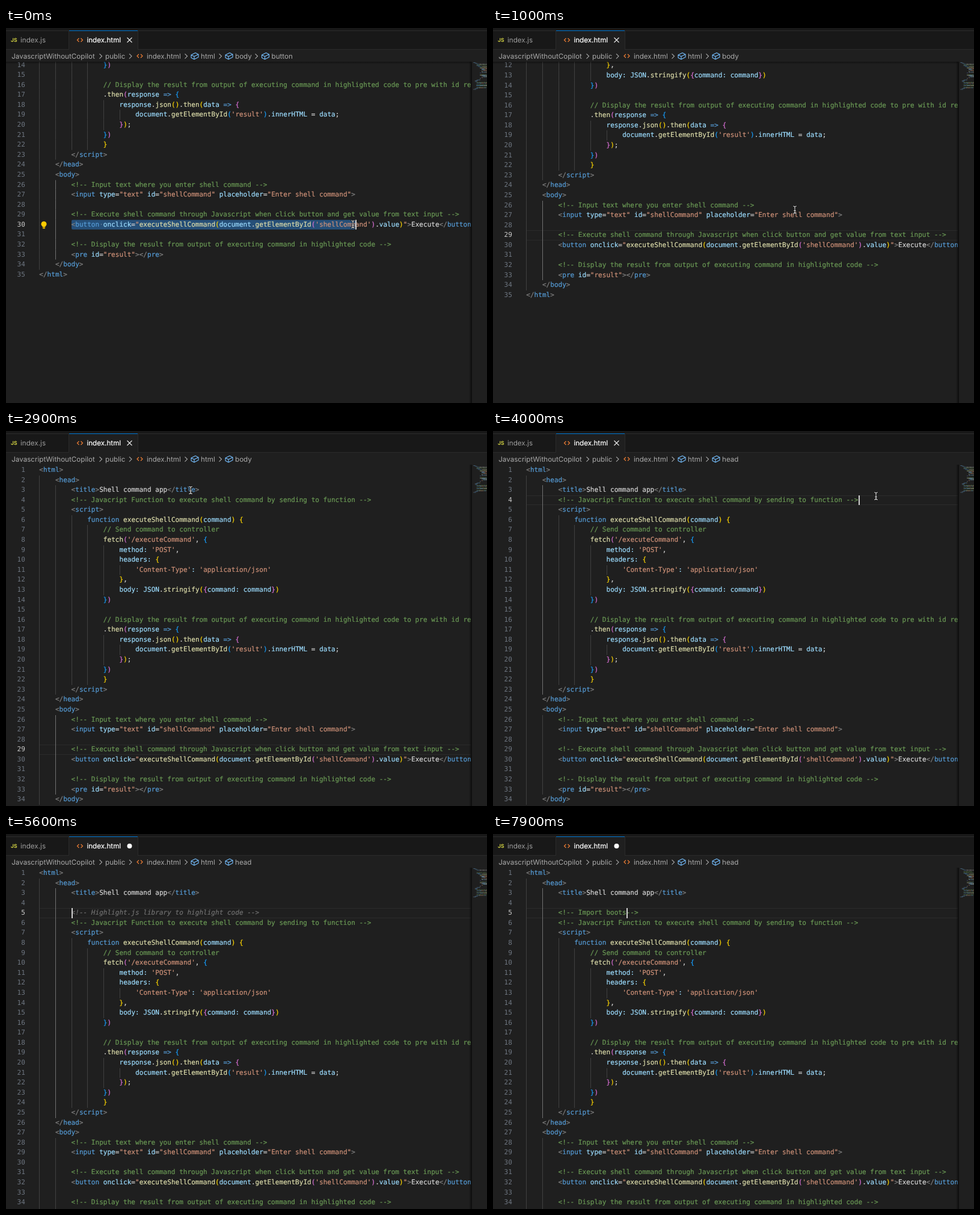
These frames come from a looping animation (800 by 623 pixels, 8 s). An HTML page with a canvas:

```html
<!DOCTYPE html>
<html lang="en">
<head>
<meta charset="utf-8">
<title>Code editor</title>
<style>
html, body { margin: 0; width: 100%; height: 100%; overflow: hidden; background: #1f1f1f; }
#stage { position: relative; width: 800px; height: 623px; overflow: hidden; text-rendering: geometricPrecision; }
#stage div, #stage canvas, #stage svg { position: absolute; }
#chrome { left: 0; top: 0; font: 11.65px Inter, sans-serif; fill: #a9a9a9; }
#editor { left: 0; top: 56px; width: 773px; height: 567px; overflow: hidden;
  font: 11.06px/16.58px "DejaVu Sans Mono", monospace; font-variant-ligatures: none; white-space: pre; color: #ccc; }
#code { left: 0; top: 1px; width: 773px; height: 600px; }
.row { left: 0; width: 773px; height: 16.58px; }
.num { width: 31.8px; text-align: right; color: #6e7681; }
.on .num { color: #ccc; }
.txt { left: 55.3px; -webkit-text-stroke: .2px; }
.guide { top: 0; width: 1px; height: 16.7px; background: #404040; }
.guide.lit { background: #707070; }
.now { left: 55px; width: 718px; height: 14.6px; border: solid #2b2b2b; border-width: 1px 0; }
.sel { height: 16.6px; background: #264f78; border-radius: 2px; }
.caret { width: 2px; height: 16.58px; background: #d0d0d0; }
#top { left: 0; top: 56px; width: 773px; height: 4px; background: linear-gradient(#000a, #0000); }
#edge { left: 770px; top: 56px; width: 5px; height: 567px; background: linear-gradient(90deg, #0000, #0009); }
#map { left: 774px; top: 56px; opacity: .55; }
#mouse { left: -6px; top: -9px; }
.g { color: #808080 } .b { color: #569cd6 } .c { color: #6a9955 } .l { color: #9cdcfe }
.o { color: #ce9178 } .y { color: #dcdcaa } .w { color: #d4d4d4 }
.p1 { color: #ffd700 } .p2 { color: #da70d6 } .p3 { color: #179fff }
.h { color: #6f6f6f; font-style: italic }
</style>
</head>
<body>
<div id="stage">
  <svg id="chrome" width="800" height="56">
    <defs>
      <path id="chev" d="M-2 -4 L2 0 L-2 4" fill="none" stroke="#a9a9a9" stroke-width="1.1"/>
      <path id="tagIcon" d="M-1.5 -3 L-4.5 0 L-1.5 3 M1.5 -3 L4.5 0 L1.5 3" fill="none" stroke="#e37933" stroke-width="1.3"/>
      <path id="cube" d="M-6 -1.8 L1 -5.3 L6 -2.8 V2 L-1 5.5 L-6 3 Z M-6 -1.8 L-1 .7 L6 -2.8 M-1 .7 V5.5" fill="none" stroke="#75beff" stroke-width="1.1" stroke-linejoin="round"/>
    </defs>
    <rect width="800" height="36" fill="#181818"/>
    <path d="M0 4.5 H800 M0 35.5 H800 M104.5 5 V36 M219.5 5 V36" stroke="#2b2b2b"/>
    <rect x="105" y="4" width="114" height="52" fill="#1f1f1f"/>
    <rect x="105" y="4" width="114" height="1" fill="#0078d4"/>
    <text x="8" y="23.4" font-size="8.6" font-weight="700" fill="#cbcb41">JS</text>
    <text x="24" y="24.2" fill="#9d9d9d">index.js</text>
    <use href="#tagIcon" x="123" y="20"/>
    <text x="134.4" y="24.2" fill="#fff" stroke="#fff" stroke-width=".2">index.html</text>
    <path id="cross" d="M201.5 16 L209.5 24 M209.5 16 L201.5 24" stroke="#e6e6e6" stroke-width="1.2"/>
    <circle id="dot" cx="205.5" cy="20" r="4" fill="#fff"/>
    <text x="9.2" y="50.8">JavascriptWithoutCopilot</text>
    <use href="#chev" x="157.5" y="46.8"/>
    <text x="165" y="50.8">public</text>
    <use href="#chev" x="207" y="46.8"/>
    <use href="#tagIcon" x="222.5" y="46.5"/>
    <text x="234" y="50.8">index.html</text>
    <use href="#chev" x="299.5" y="46.8"/>
    <use href="#cube" x="314" y="46.5"/>
    <text x="324" y="50.8">html</text>
    <use href="#chev" x="356.5" y="46.8"/>
    <use href="#cube" x="371" y="46.5"/>
    <text id="crumb" x="381" y="50.8">body</text>
    <g id="leaf">
      <use href="#chev" x="416.5" y="46.8"/>
      <use href="#cube" x="431.5" y="46.5"/>
      <text x="441.5" y="50.8">button</text>
    </g>
  </svg>
  <div id="editor"><div id="code"></div></div>
  <div id="top"></div>
  <div id="edge"></div>
  <canvas id="map" width="26" height="60"></canvas>
  <svg id="mouse" width="12" height="18">
    <defs><path id="beam" d="M3.5 3 Q6 3 6 5 Q6 3 8.5 3 M6 5 V13 M3.5 15 Q6 15 6 13 Q6 15 8.5 15 M4.6 10.5 H7.4" fill="none" stroke-linecap="round"/></defs>
    <use href="#beam" stroke="#111" stroke-width="2.6"/>
    <use href="#beam" stroke="#ddd" stroke-width="1.1"/>
  </svg>
</div>
<script>
const LOOP = 8000, TICK = 100;
const CW = 6.66, LH = 16.58, X0 = 55.3, SCROLL = 219.3;
const $ = id => document.getElementById(id);
const COLORS = { g: '#808080', b: '#569cd6', c: '#6a9955', l: '#9cdcfe', o: '#ce9178', y: '#dcdcaa', w: '#d4d4d4', 1: '#ffd700', 2: '#da70d6', 3: '#179fff' };

// A line is "indent|tokens"; tokens are split by ~ and start with a colour key.
const open = n => `g<~b${n}~g>`, close = n => `g</~b${n}~g>`;
const attr = (n, v) => `~l ${n}~w=~o"${v}"`;
const BASE = [
  `0|${open('html')}`,
  `4|${open('head')}`,
  `8|${open('title')}~wShell command app~${close('title')}`,
  '8|c<!-- Javacript Function to execute shell command by sending to function -->',
  `8|${open('script')}`,
  '12|bfunction ~yexecuteShellCommand~1(~lcommand~1)~w ~1{',
  '16|c// Send command to controller',
  "16|yfetch~2(~o'/executeCommand'~w, ~3{",
  "20|lmethod:~o 'POST'~w,",
  '20|lheaders:~w ~1{',
  "24|o'Content-Type'~l:~o 'application/json'",
  '20|1}~w,',
  '20|lbody: JSON~w.~ystringify~1(~2{~lcommand: command~2}~1)',
  '16|3}~2)',
  '16|',
  '16|c// Display the result from output of executing command in highlighted code to pre with id result',
  '16|w.~ythen~2(~lresponse ~b=>~w ~3{',
  '20|lresponse~w.~yjson~1()~w.~ythen~1(~ldata ~b=>~w ~2{',
  "24|ldocument~w.~ygetElementById~3(~o'result'~3)~w.~linnerHTML~w = ~ldata~w;",
  '20|2}~1)~w;',
  '16|3}~2)',
  '16|1}',
  `8|${close('script')}`,
  `4|${close('head')}`,
  `4|${open('body')}`,
  '8|c<!-- Input text where you enter shell command -->',
  `8|g<~binput${attr('type', 'text')}${attr('id', 'shellCommand')}${attr('placeholder', 'Enter shell command')}~g>`,
  '8|',
  '8|c<!-- Execute shell command through Javascript when click button and get value from text input -->',
  `8|g<~bbutton~l onclick~w=~o"~yexecuteShellCommand~1(~ldocument~w.~ygetElementById~2(~o'shellCommand'~2)~w.~lvalue~1)~o"~g>~wExecute~${close('button')}`,
  '8|',
  '8|c<!-- Display the result from output of executing command in highlighted code -->',
  `8|g<~bpre${attr('id', 'result')}~g>~${close('pre')}`,
  `4|${close('body')}`,
  `0|${close('html')}`
];

const TYPED = '<!-- Import boots';
const GHOST = '<!-- Highlight.js library to highlight code -->';
const KEYS = [5700, 5800, 5900, 6000, 6300, 6400, 6600, 6800, 6900, 7000, 7100, 7200, 7400, 7600, 7700, 7800, 7900];
const PATH = [[100, 577, 326], [600, 502, 302], [1500, 502, 302], [1800, 354, 92], [2000, 354, 92],
  [2500, 260, 97], [2700, 260, 97], [3600, 633, 107], [3700, 637, 108]];

const clamp = v => Math.max(0, Math.min(1, v));
const smooth = v => v * v * (3 - 2 * v);
const pick = (t, steps) => steps.filter(s => s[0] <= t).pop()[1];
const esc = s => s.replace(/&/g, '&amp;').replace(/</g, '&lt;');

function mouseAt(t) {
  let [, x, y] = PATH[0];
  for (let i = 1; i < PATH.length; i++) {
    const [a, ax, ay] = PATH[i - 1], [b, bx, by] = PATH[i];
    if (t < a) break;
    const k = smooth(clamp((t - a) / (b - a)));
    x = ax + (bx - ax) * k;
    y = ay + (by - ay) * k;
  }
  return [x, y];
}

function typedLine(t) {
  const n = KEYS.filter(k => k <= t).length;
  const parts = [];
  if (n) parts.push((n < 4 ? 'g' : 'c') + TYPED.slice(0, n));
  if (t >= 5400 && t < 6000) parts.push('h' + GHOST.slice(n));
  if (t >= 6200 && t < 6400) parts.push('h' + GHOST.slice(n, -3));
  if (n >= 4) parts.push('c-->');
  return { line: '8|' + parts.join('~'), col: 8 + n };
}

const parse = line => {
  const cut = line.indexOf('|');
  const body = line.slice(cut + 1);
  return { indent: +line.slice(0, cut), tokens: body ? body.split('~').map(s => [s[0], s.slice(1)]) : [] };
};

function rowHtml({ indent, tokens }, i, s) {
  let html = `<div class="row${i + 1 === s.active ? ' on' : ''}" style="top:${i * LH}px"><div class="num">${i + 1}</div>`;
  const inHead = i < 23 + s.extra;
  for (let c = 0; c < indent; c += 4) {
    const lit = c === 4 && inHead === (s.crumb === 'head');
    html += `<div class="guide${lit ? ' lit' : ''}" style="left:${X0 + c * CW}px"></div>`;
  }
  const text = tokens.map(([k, v]) => `<span class="${k > 0 ? 'p' + k : k}">${esc(v)}</span>`).join('');
  return html + `<div class="txt" style="left:${X0 + indent * CW}px">${text}</div></div>`;
}

function drawMap(rows, selected) {
  const g = $('map').getContext('2d');
  g.clearRect(0, 0, 26, 60);
  if (selected) {
    g.fillStyle = '#2f7fc4';
    g.fillRect(8, 29 * 1.31 + .5, 18, 1.6);
  }
  rows.forEach(({ indent, tokens }, i) => {
    let col = indent;
    for (const [k, v] of tokens) {
      g.fillStyle = COLORS[k] || '#1f1f1f';
      for (const m of v.matchAll(/\S+/g))
        g.fillRect(3 + (col + m.index) * .7, 1 + i * 1.31, m[0].length * .7, .9);
      col += v.length;
    }
  });
}

const BULB = `<svg style="left:57px;top:${29 * LH + 1}px" width="12" height="15"><path d="M6 1.5a4.4 4.4 0 0 0-2.6 8L3.8 11h4.4l.4-1.5A4.4 4.4 0 0 0 6 1.5Z M4 11.8h4v1.7H4Z" fill="#fc0"/></svg>`;

function drawCode(s, typed) {
  const lines = BASE.slice();
  if (s.extra) lines.splice(3, 0, ...(s.extra > 1 ? ['8|', typed.line] : ['8|']));
  const rows = lines.map(parse);
  const top = n => (n - 1) * LH;
  let html = '';
  if (s.selected) {
    html += `<div class="sel" style="left:${X0 + 8 * CW}px;top:${top(30)}px;width:${71 * CW}px"></div>`;
    html += `<div style="left:${X0 + 15 * CW}px;top:${top(30)}px;opacity:.4">·</div>`;
  } else {
    html += `<div class="now" style="top:${top(s.active)}px"></div>`;
  }
  html += rows.map((r, i) => rowHtml(r, i, s)).join('');
  if (s.col) html += `<div class="caret" style="left:${X0 + s.col * CW}px;top:${top(s.active)}px"></div>`;
  if (s.selected) html += BULB;
  $('code').innerHTML = html;
  drawMap(rows, s.selected);
}

let lastKey = '';
function render(t) {
  const typed = typedLine(t);
  const s = {
    selected: t < 400,
    extra: pick(t, [[0, 0], [4600, 1], [5000, 2]]),
    active: pick(t, [[0, 30], [400, 29], [3800, 4], [4200, 3], [4600, 4], [5000, 5]]),
    col: pick(t, [[0, 79], [400, 0], [3800, 83], [4200, 40], [4600, 8], [5000, typed.col]]),
    crumb: t < 3800 ? 'body' : 'head'
  };
  const key = JSON.stringify(s) + typed.line;
  if (key !== lastKey) {
    lastKey = key;
    drawCode(s, typed);
    $('crumb').textContent = s.crumb;
    $('leaf').style.display = s.selected ? '' : 'none';
    $('cross').style.display = s.extra ? 'none' : '';
    $('dot').style.display = s.extra ? '' : 'none';
  }
  const scroll = SCROLL * (1 - smooth(clamp((t - 800) / 800)));
  $('code').style.transform = `translateY(${-scroll}px)`;
  $('top').style.opacity = scroll > 0 ? .6 : 0;
  const [x, y] = mouseAt(t);
  $('mouse').style.transform = `translate(${x}px,${y}px)`;
  $('mouse').style.display = t < 4200 ? '' : 'none';
}

const start = performance.now();
function frame() {
  const t = (performance.now() - start) % LOOP;
  render(Math.floor(t / TICK) * TICK);
  requestAnimationFrame(frame);
}
frame();
</script>
</body>
</html>
```
